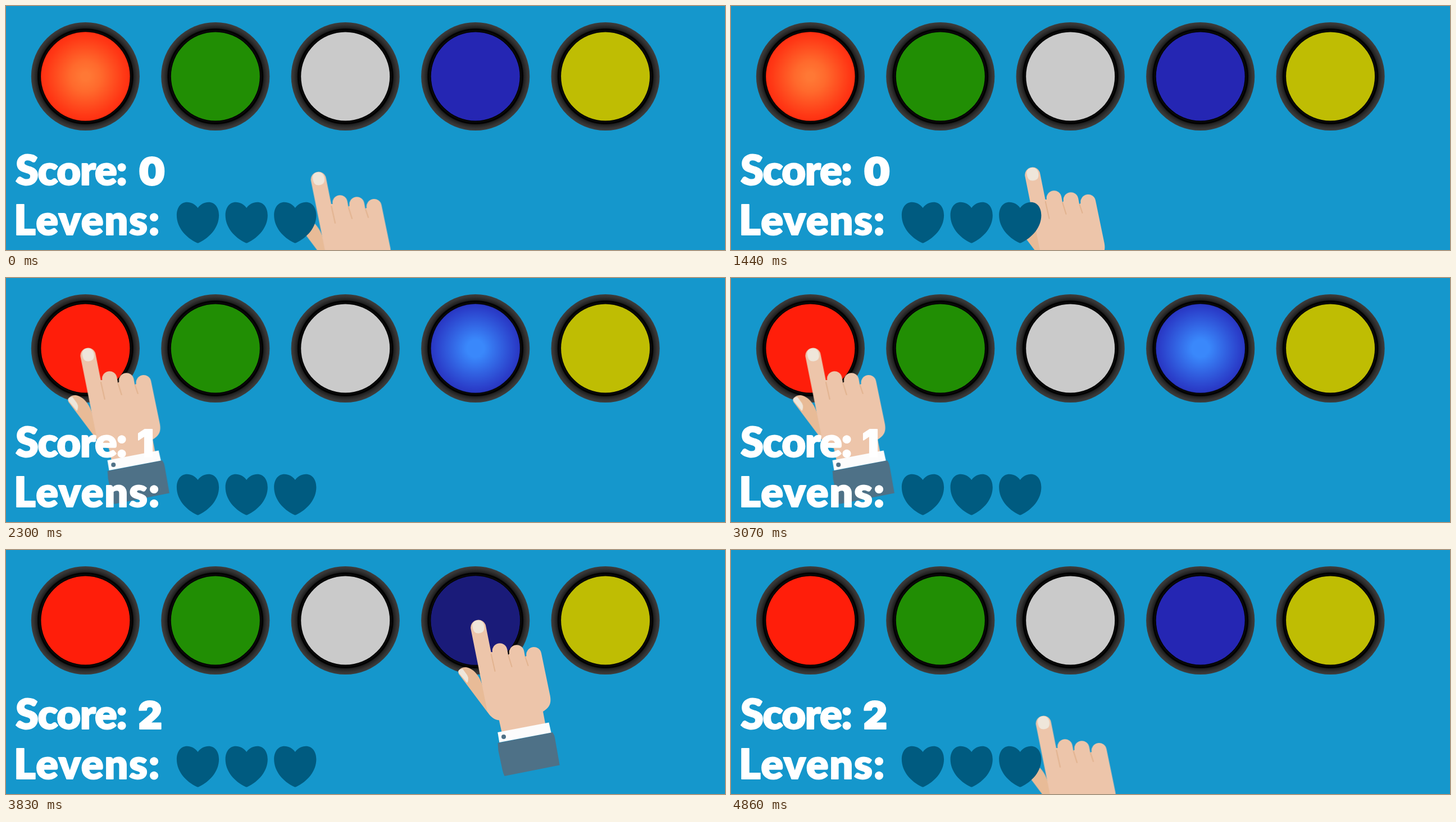
Write an HTML page that moves like this. It is 1280 by 435 pixels and loops after 4990 ms.

```html
<!DOCTYPE html>
<html lang="nl">
<head>
<meta charset="utf-8">
<title>Kleurknoppen</title>
<style>
  html, body { margin: 0; width: 100%; height: 100%; overflow: hidden; background: #1597cc; }
  svg { display: block; width: 100%; height: 100%; }
  text { font: 900 74px Lato, sans-serif; fill: #fff; stroke: #fff; stroke-width: 2px; stroke-linejoin: round; }
  .digit { font: 900 67px Inter, sans-serif; }

  .timed { opacity: 0; animation: 4990ms step-end infinite; }
  .red-lit { animation-name: red-lit; }
  .red-down { animation-name: red-down; }
  .blue-lit { animation-name: blue-lit; }
  .blue-down { animation-name: blue-down; }
  .green-lit { animation-name: green-lit; }
  .score-0 { animation-name: score-0; }
  .score-1 { animation-name: score-1; }
  .score-2 { animation-name: score-2; }

  @keyframes red-lit { 0%, 20.83% { opacity: 1 } 11.41%, 31.45%, 100% { opacity: 0 } }
  @keyframes red-down { 0%, 46.08%, 100% { opacity: 0 } 41.47% { opacity: 1 } }
  @keyframes blue-lit { 0%, 52.09%, 72.13%, 100% { opacity: 0 } 41.47%, 61.51% { opacity: 1 } }
  @keyframes blue-down { 0%, 82.15%, 100% { opacity: 0 } 76.74% { opacity: 1 } }
  @keyframes green-lit { 0%, 92.77%, 100% { opacity: 0 } 82.15% { opacity: 1 } }
  @keyframes score-0 { 0% { opacity: 1 } 41.47%, 100% { opacity: 0 } }
  @keyframes score-1 { 0%, 76.74%, 100% { opacity: 0 } 41.47% { opacity: 1 } }
  @keyframes score-2 { 0% { opacity: 0 } 76.74%, 100% { opacity: 1 } }

  /* The hand advances once every 30 ms. */
  .hand { animation: travel 4990ms linear infinite; }
  @keyframes travel {
    0% { transform: translate(-284.5px, 171px); }
    28.24% { transform: translate(-284.5px, 171px); animation-timing-function: steps(21); }
    40.86% { transform: translate(-694.8px, 0); }
    62.3% { transform: translate(-694.8px, 0); animation-timing-function: steps(23); }
    76.13% { transform: translate(0, 0); }
    89.56% { transform: translate(0, 0); animation-timing-function: steps(13); }
    97.37%, 100% { transform: translate(-284.5px, 171px); }
  }
</style>
</head>
<body>
<svg viewBox="0 0 1280 435" preserveAspectRatio="none">
  <defs>
    <radialGradient id="rim">
      <stop offset=".82" stop-color="#000"/>
      <stop offset=".845" stop-color="#0c0c0c"/>
      <stop offset=".86" stop-color="#000"/>
      <stop offset=".88" stop-color="#050505"/>
      <stop offset=".89" stop-color="#1e1e1e"/>
      <stop offset=".95" stop-color="#333"/>
      <stop offset="1" stop-color="#3e3e3e"/>
    </radialGradient>
    <radialGradient id="red-glow">
      <stop offset=".1" stop-color="#ff7835"/>
      <stop offset=".35" stop-color="#ff6a2d"/>
      <stop offset=".9" stop-color="#ff3715"/>
      <stop offset="1" stop-color="#ff3112"/>
    </radialGradient>
    <radialGradient id="green-glow">
      <stop offset=".15" stop-color="#55e03a"/>
      <stop offset=".9" stop-color="#2ba510"/>
      <stop offset="1" stop-color="#279b0b"/>
    </radialGradient>
    <radialGradient id="blue-glow">
      <stop offset=".2" stop-color="#3a88fb"/>
      <stop offset=".9" stop-color="#2b40cb"/>
      <stop offset="1" stop-color="#2938c2"/>
    </radialGradient>
    <circle id="ring" r="96.6" fill="url(#rim)"/>
    <circle id="cap" r="79"/>
    <path id="heart" fill="#005b80" d="M0 360C-5 353 -12 349.700-19 349.700C-31 349.700-37.600 360-37.600 373C-37.600 395-21 413-2 422Q0 423 2 422C21 413 37.600 395 37.600 373C37.600 360 31 349.700 19 349.700C12 349.700 5 353 0 360Z"/>
  </defs>

  <rect width="1280" height="435" fill="#1597cc"/>

  <g transform="translate(141.4 125.5)">
    <use href="#ring"/>
    <use href="#cap" fill="#ff1e0a"/>
    <use href="#cap" fill="url(#red-glow)" class="timed red-lit"/>
    <use href="#cap" fill="#aa1407" class="timed red-down"/>
  </g>
  <g transform="translate(372.800 125.5)">
    <use href="#ring"/>
    <use href="#cap" fill="#218e04"/>
    <use href="#cap" fill="url(#green-glow)" class="timed green-lit"/>
  </g>
  <g transform="translate(604.2 125.5)">
    <use href="#ring"/>
    <use href="#cap" fill="#cacaca"/>
  </g>
  <g transform="translate(835.700 125.5)">
    <use href="#ring"/>
    <use href="#cap" fill="#2526b3"/>
    <use href="#cap" fill="url(#blue-glow)" class="timed blue-lit"/>
    <use href="#cap" fill="#1a1b79" class="timed blue-down"/>
  </g>
  <g transform="translate(1067.1 125.5)">
    <use href="#ring"/>
    <use href="#cap" fill="#bfbd03"/>
  </g>

  <g class="hand">
    <!-- thumb -->
    <path fill="#e8bb97" d="M806 221C803 214 811 208 819 209C832 211 842 224 847 238L868 299L857 289Z"/>
    <path fill="#efe6da" d="M813 212L821 223Q825 230 821 237L806 219Q803 213 813 212Z"/>
    <!-- palm and fingers -->
    <path fill="#edc5aa" d="M827.500 141A13.500 13.500 0 0 1 854.200 135.500L863.500 182L866 182A13.300 13.300 0 0 1 892.200 177L894 187L896 185A13.300 13.300 0 0 1 922.200 180L924 190L926.500 189A13.300 13.300 0 0 1 953 184L968.700 260C971 273 968 281 956 288L960.500 312L883 327L877.800 303.500C869 303 861 296 857 288Z"/>
    <path fill="none" stroke="#e2b38f" stroke-width="2" stroke-linecap="round" d="M863.800 186L870.500 216M894.300 188L900.500 208M924.500 191L929.500 206"/>
    <path fill="#efe6da" d="M831 139C828.500 130 834 125.300 840 125.300C847 125.300 851 130 851.500 137C852 143 850 147 843 148.300C836 149.500 832.500 146 831 139Z"/>
    <!-- sleeve -->
    <path fill="#4e7187" d="M875.500 344L973 325Q976.500 330 977.500 337L985.700 383.500L887.500 403Q885 398 883.500 391L876.500 358Z"/>
    <path fill="#fcfcfc" d="M875.300 325L966.500 307.500L970.500 325.500L878.300 343Z"/>
    <circle cx="886" cy="333" r="4" fill="#4e7187"/>
  </g>

  <text x="17" y="319" letter-spacing="-1.5">Score:</text>
  <text x="14" y="408" letter-spacing="1.600">Levens:</text>
  <text class="digit timed score-0" x="236" y="319">0</text>
  <text class="digit timed score-1" x="233" y="319">1</text>
  <text class="digit timed score-2" x="235" y="319">2</text>

  <use href="#heart" x="341.500"/>
  <use href="#heart" x="428.200"/>
  <use href="#heart" x="514.800"/>
</svg>
</body>
</html>
```
